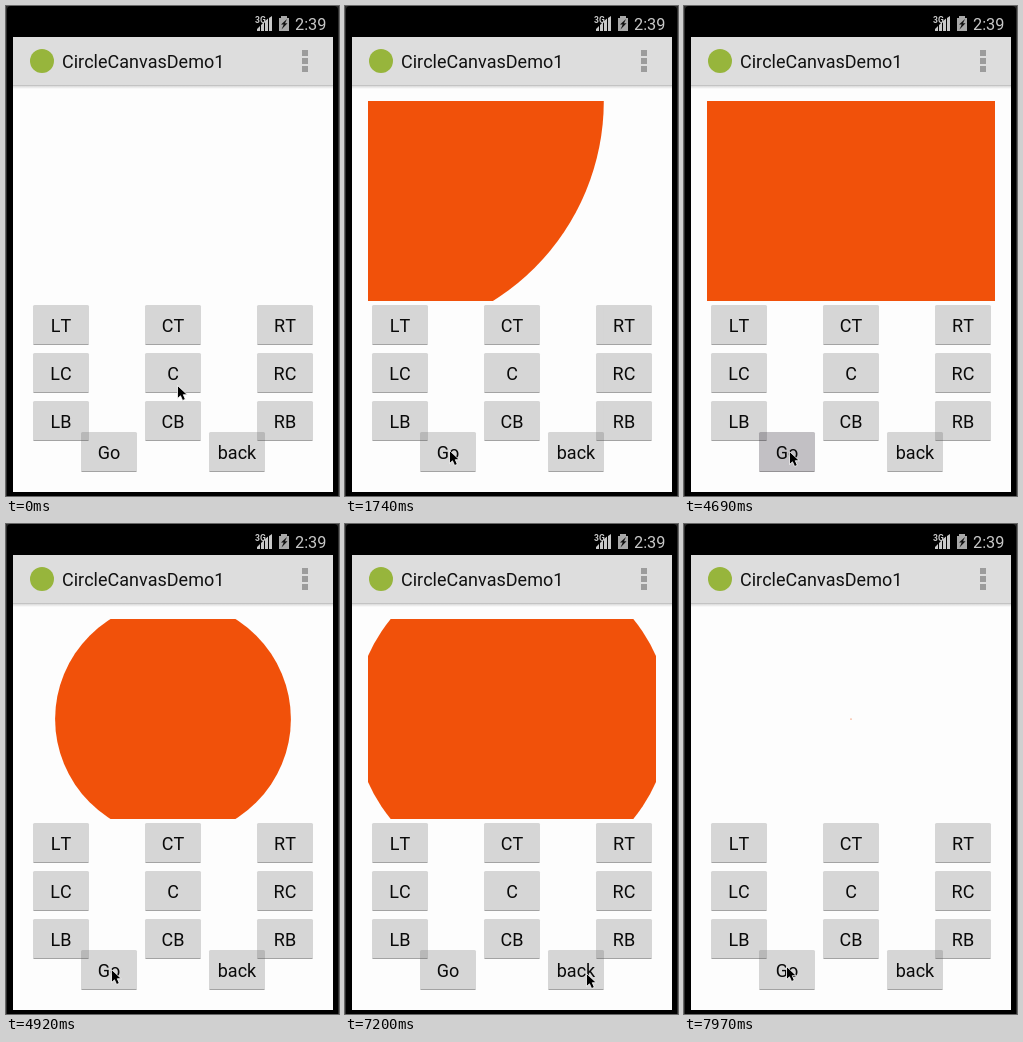
Animation of 333x490 px, one loop 8000 ms. Source, as an HTML page:

```html
<!DOCTYPE html>
<html>
<head>
<meta charset="utf-8">
<style>
html, body { margin: 0; width: 100%; height: 100%; overflow: hidden; background: #000; }
svg { display: block; width: 333px; height: 490px; font: 18px Roboto, sans-serif; font-kerning: none; }
</style>
</head>
<body>
<svg viewBox="0 0 333 490">
  <defs>
    <clipPath id="view"><rect x="23" y="95" width="288" height="200"/></clipPath>
    <linearGradient id="shade" x2="0" y2="1">
      <stop stop-color="#b4b4b4"/>
      <stop offset=".35" stop-color="#dedede"/>
      <stop offset="1" stop-color="#fdfdfd"/>
    </linearGradient>
  </defs>
  <rect width="333" height="490" fill="#2c2c2c"/>
  <rect x="1" width="331" height="500" rx="4" fill="#000"/>
  <rect x="7" y="31" width="320" height="455" fill="#fdfdfd"/>
  <rect x="7" y="31" width="320" height="48" fill="#ddd"/>
  <rect x="7" y="79" width="320" height="4" fill="url(#shade)"/>

  <g fill="#c8c8c8">
    <text x="249" y="17" font-size="8.5" font-weight="700">3G</text>
    <path d="M251 25V23L254 20V25ZM255 25V19L258 16V25ZM259 25V15L262 12.500V25ZM263 25V12L266 10V25Z"/>
    <path d="M275 10H281V12H283V25H273V12H275Z" fill="#a8a8a8"/>
    <path d="M281 13L275 18.500H277.700L275.500 23.500L281.500 17.300H279Z" fill="#111"/>
    <text x="289" y="24" font-size="16.300">2:39</text>
  </g>

  <circle cx="36" cy="55" r="12" fill="#97b53c"/>
  <text x="56" y="62" fill="#111">CircleCanvasDemo1</text>
  <path d="M296 44h6v6h-6zM296 52h6v6h-6zM296 60h6v6h-6z" fill="#9c9c9c"/>

  <g clip-path="url(#view)"><circle id="disc" fill="#f1510a"/></g>
  <g id="buttons"></g>
  <path id="cursor" d="M.5 .500V13.500L3.500 10.800L5.600 15.500L8.300 14.300L6.300 9.700H10.300Z"
    fill="#000" stroke="#fff" stroke-width=".8"/>
</svg>
<script>
const LOOP = 8000;
const STEP = 19.65;  // radius change per tick
const TICK = 28;     // ms
const $ = id => document.getElementById(id);
const NS = 'http://www.w3.org/2000/svg';

function add(parent, tag, attrs) {
  const el = document.createElementNS(NS, tag);
  for (const k in attrs) el.setAttribute(k, attrs[k]);
  return parent.appendChild(el);
}

function button(label, x, y) {
  const g = add($('buttons'), 'g', { transform: `translate(${x} ${y})` });
  const face = add(g, 'rect', { width: 56, height: 40, rx: 1.5 });
  add(g, 'rect', { x: 0.5, y: 39, width: 55, height: 1, 'fill-opacity': 0.24 });
  add(g, 'text', { x: 28, y: 27, 'text-anchor': 'middle', fill: '#0a0a0a' }).textContent = label;
  press(face, false);
  return face;
}

function press(face, on) {
  face.setAttribute('fill', on ? '#110b18' : '#535353');
  face.setAttribute('fill-opacity', on ? 0.25 : 0.23);
}

['T', 'C', 'B'].forEach((row, j) => ['L', 'C', 'R'].forEach((col, i) =>
  button(col + row === 'CC' ? 'C' : col + row, 27 + 112 * i, 299 + 48 * j)));
const go = button('Go', 75, 426);
const back = button('back', 203, 426);

// mouse moves: start, end, goal and, for curved ones, a control point
const moves = [
  { from: 310, to: 850, goal: [118, 444], via: [282, 425] },
  { from: 1100, to: 1130, goal: [104, 444] },
  { from: 2550, to: 2710, goal: [172, 342] },
  { from: 2920, to: 3190, goal: [164, 364], via: [166, 362] },
  { from: 3370, to: 4150, goal: [107, 452], via: [220, 500] },
  { from: 4180, to: 4320, goal: [105, 445] },
  { from: 5920, to: 5930, goal: [145, 443] },
  { from: 5960, to: 6550, goal: [241, 449], via: [195, 430] },
  { from: 7530, to: 7970, goal: [102, 442], via: [165, 430] }
];

const ease = k => k * k * (3 - 2 * k);

function cursorAt(t) {
  let pos = [171, 379];
  for (const { from, to, goal, via } of moves) {
    if (t < from) break;
    const k = ease(Math.min(1, (t - from) / (to - from)));
    pos = pos.map((p, i) => {
      const c = via ? via[i] : (p + goal[i]) / 2;
      return (1 - k) ** 2 * p + 2 * k * (1 - k) * c + k * k * goal[i];
    });
  }
  return pos.map(Math.round);
}

const ticks = (t, from) => Math.floor((t - from) / TICK);

function discAt(t) {
  if (t < 4780) return [23, 95, STEP * Math.min(18, Math.max(0, ticks(t, 1404)))];
  const n = t < 7200 ? Math.min(9, 1 + ticks(t, 4780)) : 8 - ticks(t, 7200);
  return [167, 195, Math.max(0.6, STEP * n)];
}

function draw(t) {
  const [cx, cy, r] = discAt(t);
  $('disc').setAttribute('cx', cx);
  $('disc').setAttribute('cy', cy);
  $('disc').setAttribute('r', r);
  press(go, (t >= 1380 && t < 1432) || (t >= 4690 && t < 4780));
  press(back, t >= 6860 && t < 6920);
  $('cursor').setAttribute('transform', `translate(${cursorAt(t)})`);
}

const start = performance.now();
function frame() {
  draw((performance.now() - start) % LOOP);
  requestAnimationFrame(frame);
}
draw(0);
requestAnimationFrame(frame);
</script>
</body>
</html>
```
